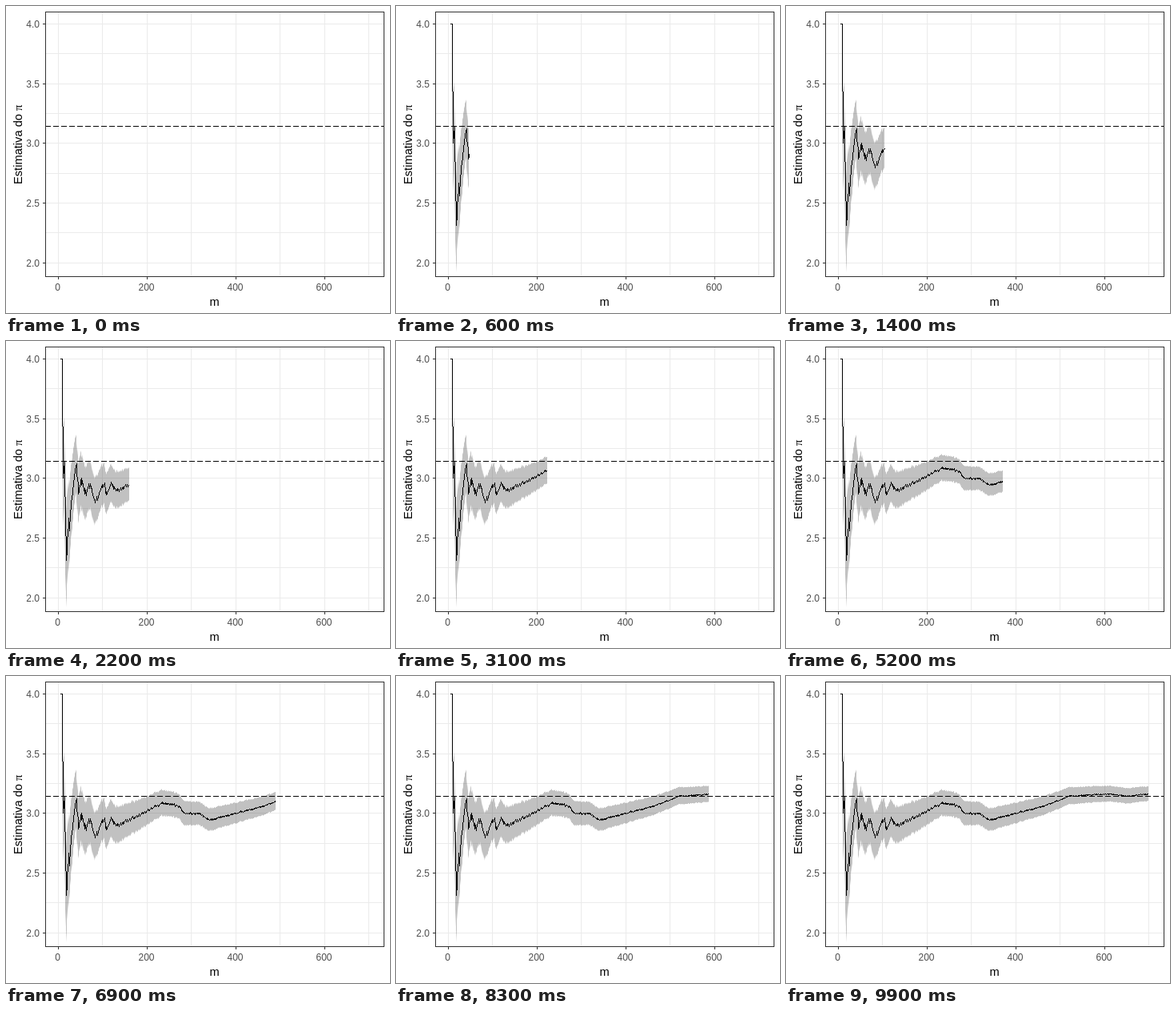
Write an HTML page with a canvas that moves like this. It is 480 by 384 pixels and loops after 10 s.

```html
<!DOCTYPE html>
<html lang="pt">
<head>
<meta charset="utf-8">
<style>
html, body { margin: 0; width: 100%; height: 100%; overflow: hidden; background: #fff; }
canvas { display: block; }
</style>
</head>
<body>
<canvas id="c" width="480" height="384"></canvas>
<script>
const ctx = document.getElementById('c').getContext('2d');
const SANS = '"Liberation Sans", Arial, sans-serif';
const SERIF = '"Liberation Serif", "Times New Roman", serif';
const LEFT = 49, TOP = 7, RIGHT = 472, BOTTOM = 338;
const STEP_MS = 100, STEPS = 100;
const FIRST = 6, LAST = 700;

// Data to whole pixels
const px = m => Math.round(64.8 + 0.555 * m);
const py = v => Math.round(320.8 - 149.4 * (v - 2));

// Main turns of the estimate, as [m, value]
const turns = [
  [6, 4], [18, 2.45], [37, 3.13], [46, 2.91], [50, 3.02], [58, 2.87],
  [72, 2.95], [81, 2.81], [104, 2.95], [108, 2.88], [118, 2.96], [131, 2.9],
  [178, 2.98], [233, 3.09], [272, 3.06], [283, 3], [318, 3], [340, 2.945],
  [460, 3.06], [520, 3.145], [612, 3.165], [650, 3.145], [700, 3.165]
];

function trend(m) {
  const i = Math.max(1, turns.findIndex(t => t[0] >= m));
  const [m0, v0] = turns[i - 1], [m1, v1] = turns[i];
  return v0 + (v1 - v0) * (m - m0) / (m1 - m0);
}

function seeded(seed) {
  return () => {
    seed = (seed * 16807) % 2147483647;
    return seed / 2147483647;
  };
}

// Running estimate 4 * hits / m with a band of about one standard error
function throwDarts() {
  const random = seeded(314);
  const points = [];
  let hits = FIRST - 1;
  for (let m = FIRST; m <= LAST; m++) {
    if (4 * hits / m + 4 * random() / m < trend(m) || m === FIRST) hits++;
    const v = 4 * hits / m;
    const err = Math.sqrt(v * (4 - v) / (m + 6));
    points.push({ m, x: px(m), y: py(v), hi: py(v + err), lo: py(v - err) });
  }
  return points;
}
const points = throwDarts();

function text(str, x, y, size, color, align, family = SANS) {
  ctx.font = size + 'px ' + family;
  ctx.fillStyle = color;
  ctx.textAlign = align;
  ctx.fillText(str, x, y);
}

function grid() {
  ctx.fillStyle = '#ebebeb';
  for (let m = 0; m <= 700; m += 100) ctx.fillRect(px(m), TOP, 1, BOTTOM - TOP);
  for (let v = 2; v <= 4; v += 0.25) ctx.fillRect(LEFT, py(v), RIGHT - LEFT, 1);
}

function band(shown) {
  ctx.beginPath();
  for (const p of shown) ctx.lineTo(p.x, p.hi);
  for (const p of [...shown].reverse()) ctx.lineTo(p.x, p.lo);
  ctx.closePath();
  ctx.fillStyle = 'rgba(51,51,51,0.3)';
  ctx.fill();
}

// Hard-edged line, one pixel per step along the longer side
function crispLine(a, b) {
  const dx = b.x - a.x, dy = b.y - a.y;
  const n = Math.max(Math.abs(dx), Math.abs(dy));
  for (let i = 0; i < n; i++) {
    ctx.fillRect(Math.round(a.x + dx * i / n), Math.round(a.y + dy * i / n), 1, 1);
  }
}

function curve(shown) {
  ctx.fillStyle = '#000';
  for (let i = 1; i < shown.length; i++) crispLine(shown[i - 1], shown[i]);
}

function piLine() {
  ctx.beginPath();
  ctx.moveTo(LEFT, py(Math.PI) + 0.5);
  ctx.lineTo(RIGHT, py(Math.PI) + 0.5);
  ctx.setLineDash([7, 3]);
  ctx.strokeStyle = '#000';
  ctx.lineWidth = 1;
  ctx.stroke();
  ctx.setLineDash([]);
}

function axes() {
  ctx.strokeStyle = '#333';
  ctx.strokeRect(LEFT + 0.5, TOP + 0.5, RIGHT - LEFT, BOTTOM - TOP);
  for (let m = 0; m <= 600; m += 200) {
    ctx.fillStyle = '#333';
    ctx.fillRect(px(m), BOTTOM + 1, 1, 3);
    text(String(m), px(m) - 0.5, 356, 12, '#4d4d4d', 'center');
  }
  for (let v = 2; v <= 4; v += 0.5) {
    ctx.fillStyle = '#333';
    ctx.fillRect(LEFT - 3, py(v), 3, 1);
    text(v.toFixed(1), 42, py(v) + 5, 12, '#4d4d4d', 'right');
  }
  text('m', 260.5, 375, 14.67, '#000', 'center');
  ctx.save();
  ctx.translate(20, 223);
  ctx.rotate(-Math.PI / 2);
  const title = 'Estimativa do ';
  text(title, 0, 0, 14.67, '#000', 'left');
  text('π', ctx.measureText(title).width, 0, 14.67, '#000', 'left', SERIF);
  ctx.restore();
}

function draw(now) {
  const step = Math.floor(now / STEP_MS) % STEPS;
  const end = FIRST + (LAST - FIRST) * step / (STEPS - 1);
  const shown = points.filter(p => p.m <= end + 0.5);
  ctx.fillStyle = '#fff';
  ctx.fillRect(0, 0, 480, 384);
  grid();
  band(shown);
  curve(shown);
  piLine();
  axes();
}

const start = performance.now();
function tick() {
  draw(performance.now() - start);
  requestAnimationFrame(tick);
}
tick();
</script>
</body>
</html>
```
